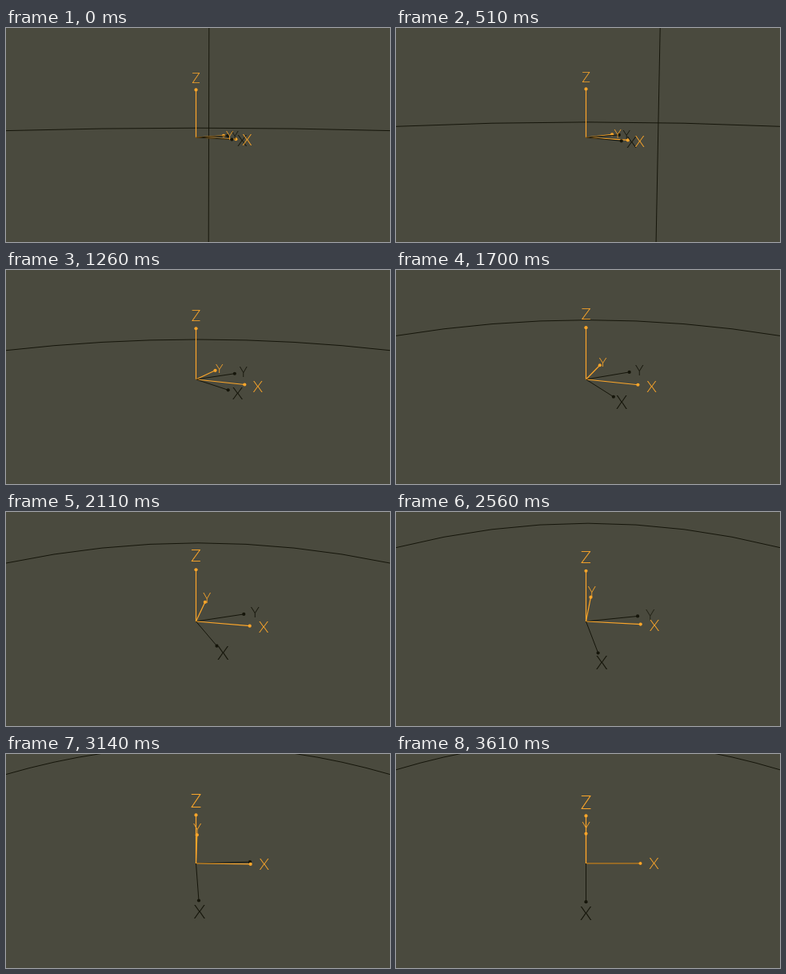
An HTML page with a canvas that plays this animation: 480x268 px, repeating every 3.64 s.

```html
<!DOCTYPE html>
<html lang="en">
<head>
<meta charset="utf-8">
<title>Rotating axes</title>
<style>
  html, body { margin: 0; width: 480px; height: 268px; overflow: hidden; background: #4a4a3e; }
  canvas { display: block; }
</style>
</head>
<body>
<canvas id="stage" width="480" height="268"></canvas>
<script>
const ctx = document.getElementById('stage').getContext('2d');
const LOOP = 3640, SWEEP = 3610, FIRST = 0.08;
const FOCAL = 415, OX = 237.5, OY = 137;
const BACK = '#4a4a3e', DARK = '#15150a', GOLD = '#fca62a';
const rad = deg => deg * Math.PI / 180;
const clamp = v => Math.max(0, Math.min(1, v));

// One eased value drives the whole scene
function progress(t) {
  const u = clamp(t / SWEEP);
  return FIRST + (1 - FIRST) * u * u * (3 - 2 * u);
}

function line(x1, y1, x2, y2, color, width) {
  ctx.strokeStyle = color;
  ctx.lineWidth = width;
  ctx.beginPath();
  ctx.moveTo(x1, y1);
  ctx.lineTo(x2, y2);
  ctx.stroke();
}

function drawSky(w) {
  const top = OY - FOCAL * Math.tan(rad(20.3 * w));
  const edge = 240 * 240 * (0.00074 * w - 0.00011 * w * w);
  ctx.strokeStyle = DARK;
  ctx.lineWidth = 1;
  ctx.beginPath();
  ctx.moveTo(0, top + edge);
  ctx.quadraticCurveTo(240, top - edge, 480, top + edge);
  ctx.stroke();

  const turn = w - FIRST, x = 253.5 + 1480 * turn, tilt = 0.3 + 45 * turn;
  line(x + tilt, 0, x - tilt, 268, DARK, 1);
}

function drawAxes(w) {
  const scale = 58 + 10 * Math.sin(w * Math.PI / 2), dist = FOCAL / scale;
  const el = rad(38.1 * w), sin = Math.sin(el), cos = Math.cos(el);

  // right, near and up are measured on the ground in front of the camera
  const project = (right, near, up) => {
    const depth = near * cos + up * sin;
    const k = scale / (1 - depth / dist);
    return { x: OX + right * k, y: OY + (near * sin - up * cos) * k, k, depth };
  };

  const axis = (name, color, right, near, up, alpha = 1) => ({
    name, color, alpha,
    tip: project(right, near, up),
    label: project(right * 1.25, near * 1.25, up * 1.25),
  });

  const pair = (turn, color, alpha) => {
    const c = Math.cos(turn), s = Math.sin(turn);
    return [axis('X', color, c, s, 0), axis('Y', color, s, -c, 0, alpha)];
  };

  // The two triads turn apart from a shared heading
  const heading = rad(45 - 4.8 * Math.sin(w * Math.PI)), spread = rad(45 * w);
  const all = [
    ...pair(heading + spread, DARK, clamp((0.96 - w) * 5)),
    ...pair(heading - spread, GOLD, 1),
    axis('Z', GOLD, 0, 0, 1),
  ];

  for (const { tip, color } of all.slice().sort((a, b) => a.tip.depth - b.tip.depth)) {
    line(OX, OY, tip.x, tip.y, color, color === GOLD ? 1.2 : 1);
    ctx.fillStyle = color;
    ctx.beginPath();
    ctx.arc(tip.x, tip.y, 2.1, 0, Math.PI * 2);
    ctx.fill();
  }

  ctx.textAlign = 'center';
  for (const { name, label, color, alpha } of all) {
    const size = 20 * label.k / 68;
    ctx.font = `300 ${size}px Lato, "Open Sans", sans-serif`;
    ctx.globalAlpha = alpha;
    ctx.fillStyle = color;
    ctx.fillText(name, label.x, label.y + size * 0.36);
  }
  ctx.globalAlpha = 1;
}

function draw(t) {
  const w = progress(t);
  ctx.fillStyle = BACK;
  ctx.fillRect(0, 0, 480, 268);
  drawSky(w);
  drawAxes(w);
}

const start = performance.now();
function tick() {
  draw((performance.now() - start) % LOOP);
  requestAnimationFrame(tick);
}
tick();
</script>
</body>
</html>
```
